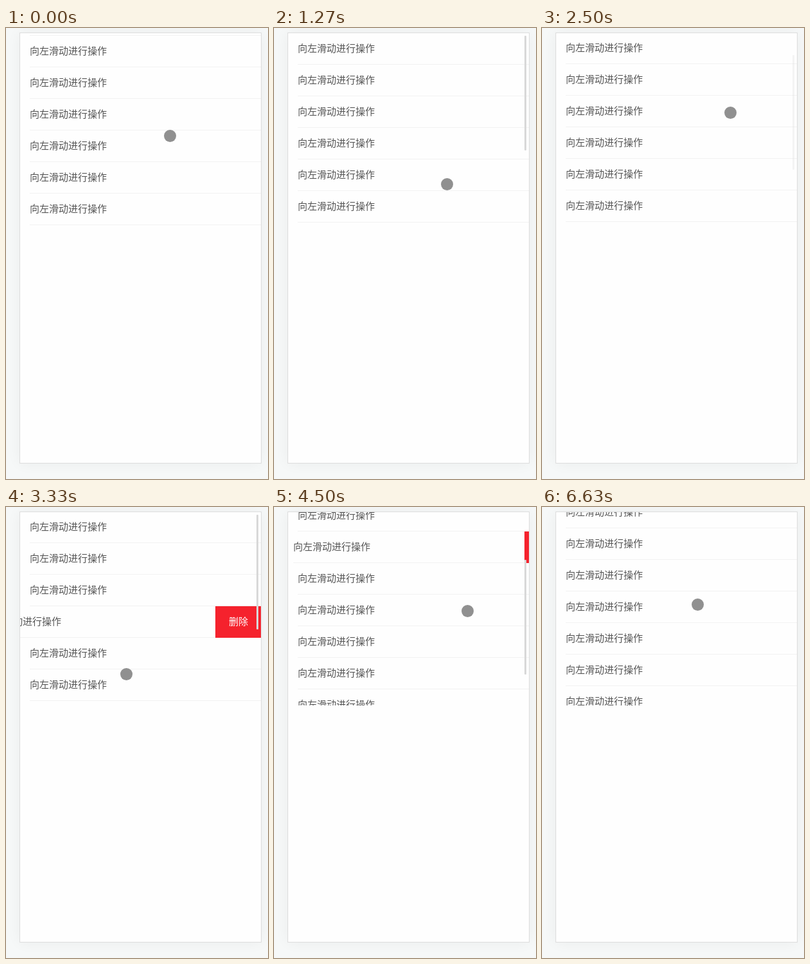
An HTML page that plays this animation: 408x700 px, repeating every 6.66 s.

```html
<!DOCTYPE html>
<html lang="zh-CN">
<head>
<meta charset="utf-8">
<title>滑动列表</title>
<style>
  html, body { margin: 0; width: 100%; height: 100%; overflow: hidden; background: #f6f8f8; }
  body { position: relative; font: 15px/46px "Noto Sans CJK SC", "Noto Sans CJK", sans-serif; color: #555; }
  #panel {
    position: absolute; left: 21px; top: 7px; width: 375px; height: 667px;
    background: #fefefe; border: 1px solid #ddd; box-shadow: 0 0 20px rgba(0, 0, 0, .05);
  }
  #list { position: relative; height: 300px; overflow: hidden; background: #fefefe; }
  .row { position: relative; margin-left: 15px; height: 48px; border-bottom: 1px solid #f2f2f2; white-space: nowrap; }
  #remove { position: absolute; left: 100%; top: 0; width: 72px; height: 49px; background: #f5222d; color: #fff; text-align: center; }
  #bar { position: absolute; left: 368px; top: 4px; width: 3px; height: 178px; border-radius: 1px; background: #d8d8d8; }
  #finger { position: absolute; left: 0; top: 0; width: 19px; height: 19px; border-radius: 50%; background: #909090; }
</style>
</head>
<body>
<div id="panel">
  <div id="list"><div id="rows"></div><div id="bar"></div></div>
</div>
<div id="finger"></div>
<script>
const LOOP = 6660, ROWS = 10, SWIPED = 3, BUTTON = 72;
const MAX_SCROLL = ROWS * 49 - 300, BAR_TRAVEL = 114;

// Each gesture starts at a time and swings through points [time, x, y].
const GESTURES = [
  { from: 540, scrolls: true, points: [[1270, 260, 233], [1650, 265, 34], [2030, 261, 174]] },
  { from: 2240, points: [[2500, 284, 122]] },
  { from: 2800, scrolls: true, swipes: true, points: [
    [3300, 177, 251], [3770, 240, 178], [4150, 299, 269],
    [4500, 292, 152], [4720, 231, 41], [5130, 312, 158],
  ] },
  { from: 5430, points: [[5730, 267, 186]] },
  { from: 5970, points: [[6470, 233, 142]] },
];

const clamp = (v, lo, hi) => Math.min(hi, Math.max(lo, v));
const ease = u => (1 - Math.cos(Math.PI * u)) / 2;
const byId = id => document.getElementById(id);

// List and row follow the finger until they hit their limits.
function poseAt(t) {
  const pose = { x: 246, y: 158, scroll: 45, shift: 0 };
  for (const { from, scrolls, swipes, points } of GESTURES) {
    let begin = from;
    for (const [end, x, y] of points) {
      if (t <= begin) return pose;
      const progress = ease(clamp((t - begin) / (end - begin), 0, 1));
      const dx = (x - pose.x) * progress, dy = (y - pose.y) * progress;
      pose.x += dx;
      pose.y += dy;
      if (scrolls) pose.scroll = clamp(pose.scroll - dy, 0, MAX_SCROLL);
      if (swipes) pose.shift = clamp(pose.shift + dx, -BUTTON, 0);
      begin = end;
    }
  }
  return pose;
}

// The bar appears quickly when a scroll starts and fades slowly after it ends.
const barOpacity = t => Math.max(...GESTURES.filter(g => g.scrolls).map(({ from, points }) =>
  clamp(Math.min((t - from) / 200, 1 - (t - points.at(-1)[0]) / 630), 0, 1)));

function move(element, x, y) {
  element.style.transform = `translate(${Math.round(x)}px, ${Math.round(y)}px)`;
}

for (let i = 0; i < ROWS; i++) {
  const row = document.createElement("div");
  row.className = "row";
  row.textContent = "向左滑动进行操作";
  byId("rows").append(row);
}
const swiped = byId("rows").children[SWIPED];
swiped.insertAdjacentHTML("beforeend", '<div id="remove">删除</div>');

function render(t) {
  const { x, y, scroll, shift } = poseAt(t);
  move(byId("rows"), 0, -scroll);
  move(swiped, shift, 0);
  move(byId("bar"), 0, Math.floor(scroll / MAX_SCROLL * BAR_TRAVEL));
  move(byId("finger"), x, y);
  byId("bar").style.opacity = barOpacity(t);
}

const start = performance.now();
function tick() {
  render((performance.now() - start) % LOOP);
  requestAnimationFrame(tick);
}
tick();
</script>
</body>
</html>
```
